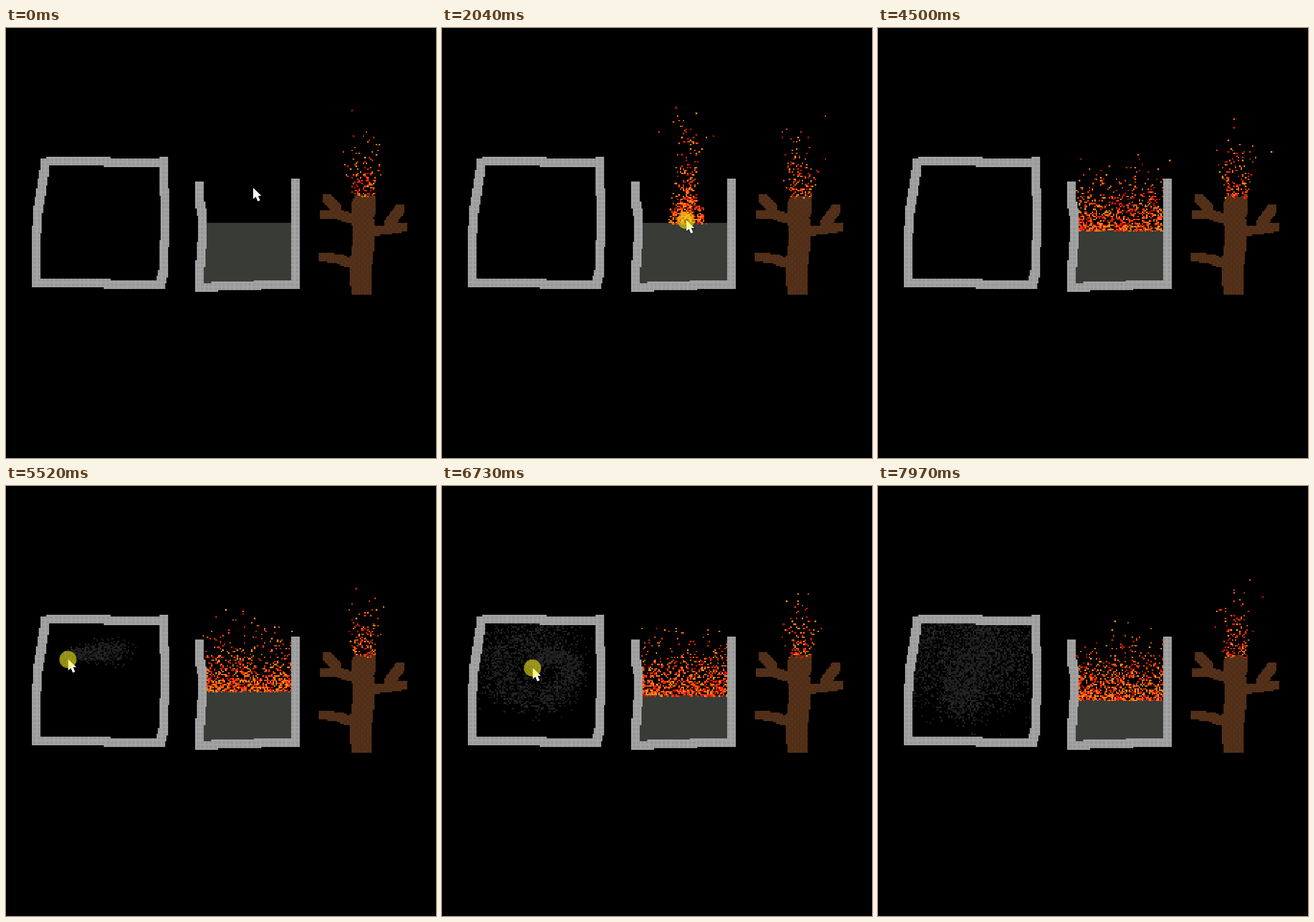
Animation, 748 px wide and 748 px high, one loop 8 s. Source, as an HTML page with a canvas:

```html
<!DOCTYPE html>
<html lang="en">
<head>
<meta charset="utf-8">
<title>Falling particles</title>
<style>
html, body { margin: 0; width: 100%; height: 100%; overflow: hidden; background: #000; }
canvas { display: block; width: 748px; height: 748px; }
</style>
</head>
<body>
<canvas id="stage" width="748" height="748"></canvas>
<script>
const SIZE = 748, CELL = SIZE / 300, LOOP = 8000, STEP = 140 / 3;
const FIRE_ON = 1000, FIRE_OFF = 2300, SMOKE_ON = 5060, SMOKE_OFF = 7250;
const FLAMES = ['#ff0d00', '#ff2a00', '#ff4a10', '#ff7a08', '#ff8c1a'];
const ctx = document.getElementById('stage').getContext('2d');

function rnd(a, b, c) {
  let h = Math.imul(a + 911, 0x9E3779B1) ^ Math.imul(b + 77, 0x85EBCA6B) ^ Math.imul(c + 13, 0xC2B2AE35);
  h = Math.imul(h ^ h >>> 15, 0x2C1B3C6D);
  h = Math.imul(h ^ h >>> 12, 0x297A2D39);
  return ((h ^ h >>> 15) >>> 0) / 4294967296;
}
const clamp = (v, lo, hi) => Math.max(lo, Math.min(hi, v));
const bell = (a, b, c) => (rnd(a, b, c) + rnd(a, b, c + 1) + rnd(a, b, c + 2) - 1.5) * 2;

// Random offset inside a disc
function inDisc(a, b, c, radius) {
  const turn = rnd(a, b, c) * Math.PI * 2, r = Math.sqrt(rnd(a, b, c + 1)) * radius;
  return { x: Math.cos(turn) * r, y: Math.sin(turn) * r };
}

function block(g, x0, y0, x1, y1, color) {
  const l = Math.round(x0 * CELL), t = Math.round(y0 * CELL);
  g.fillStyle = color;
  g.fillRect(l, t, Math.round(x1 * CELL) - l, Math.round(y1 * CELL) - t);
}
function dot(g, x, y, color) {
  x = Math.floor(x);
  y = Math.floor(y);
  block(g, x, y, x + 1, y + 1, color);
}

const stone = (x, y) => x % 3 && y % 3 ? '#999' : '#a4a4a4';
const bark = (x, y) => (x + y) % 4 && (x - y) % 4 ? '#56321a' : '#4c2b16';

// Drags a square brush along a polyline of cells
function stroke(g, brush, paint, ...points) {
  for (let i = 1; i < points.length; i++) {
    const [x0, y0] = points[i - 1], [x1, y1] = points[i];
    const n = Math.max(Math.abs(x1 - x0), Math.abs(y1 - y0));
    for (let k = 0; k <= n; k++) {
      const left = Math.round(x0 + (x1 - x0) * k / n), top = Math.round(y0 + (y1 - y0) * k / n);
      for (let y = top; y < top + brush; y++)
        for (let x = left; x < left + brush; x++) dot(g, x, y, paint(x, y));
    }
  }
}

function makeScene() {
  const layer = document.createElement('canvas');
  layer.width = layer.height = SIZE;
  const g = layer.getContext('2d');
  // closed box
  stroke(g, 6, stone, [24, 91], [24, 95], [19, 127], [18, 148], [18, 175], [30, 175], [105, 176]);
  stroke(g, 6, stone, [28, 90], [107, 91]);
  stroke(g, 6, stone, [107, 90], [107, 100], [108, 124], [108, 135], [107, 159], [107, 166], [105, 174], [105, 176]);
  // cup
  stroke(g, 6, stone, [132, 107], [132, 118], [134, 128], [134, 142], [132, 168], [132, 178], [138, 178],
    [146, 177], [199, 176], [199, 105]);
  // tree
  stroke(g, 14, bark, [241, 172], [240, 162], [242, 148], [243, 136], [241, 121], [244, 115]);
  stroke(g, 6, bark, [221, 116], [228, 123]);
  stroke(g, 6, bark, [219, 127], [229, 127], [238, 130]);
  stroke(g, 6, bark, [218, 157], [229, 158], [237, 161]);
  stroke(g, 6, bark, [252, 139], [274, 136]);
  stroke(g, 6, bark, [272, 123], [264, 134]);
  return layer;
}
const scene = makeScene();

// Smooth curve through points that are evenly spaced in time
function curve(points, start, gap, t) {
  const pos = clamp((t - start) / gap, 0, points.length - 1);
  const i = Math.min(Math.floor(pos), points.length - 2), u = pos - i;
  const at = k => points[clamp(k, 0, points.length - 1)];
  const mix = n => {
    const a = at(i - 1)[n], b = at(i)[n], c = at(i + 1)[n], d = at(i + 2)[n];
    return b + u * (c - a + u * (2 * a - 5 * b + 4 * c - d + u * (3 * (b - c) + d - a))) / 2;
  };
  return { x: mix(0), y: mix(1) };
}
const DIP = [[430, 278], [430, 306], [425, 334], [427, 332]];
const EXIT = [[427, 332], [428, 300], [442, 215], [770, 45]];
const SWIRL = [[770, 200], [268, 285], [160, 292], [107, 303], [115, 360], [190, 377],
  [228, 322], [183, 296], [147, 334], [146, 375], [148, 394]];

function pointerAt(t) {
  if (t < 2400) return curve(DIP, 0, 1000, t);
  if (t < 4000) return curve(EXIT, 2400, 530, t);
  return curve(SWIRL, 4740, 260, t);
}

const surfaceAt = t => 136 + Math.max(0, t - 2400) * 0.00234;
const spreadAt = t => Math.max(0, t - FIRE_ON) * 0.0131;

// Sparks born at each step rise, drift and die out at random
function sparks(step, seed, o) {
  for (let age = 0; age < o.life; age++) {
    const born = step - age;
    for (let j = 0; j < o.rate; j++) {
      const id = seed + j * 16;
      if (age > (1 - Math.pow(rnd(born, id, 0), 1 / o.decay)) * o.life) continue;
      const from = o.origin(born, id);
      if (!from) continue;
      const speed = o.slow + (o.fast - o.slow) * rnd(born, id, 1);
      const wobble = age ? (rnd(born, id, 40 + age) - 0.5) * 2 : 0;
      const x = from.x + bell(born, id, 2) * o.drift * age + wobble;
      const y = from.y - speed * age;
      dot(ctx, o.cup ? insideCup(x, y) : x, y, FLAMES[Math.floor(rnd(born, id, 6) * FLAMES.length)]);
    }
  }
}

function insideCup(x, y) {
  if (y < 105) return x;
  return clamp(x, y > 121 ? 140 : 138, 198);
}

function drawFire(t, step) {
  const tree = {
    rate: 14, life: 27, decay: 2, slow: 1.5, fast: 2.6, drift: 0.38,
    origin: (b, id) => ({ x: 242 + rnd(b, id, 7) * 16, y: 115 + t / 4000 + rnd(b, id, 8) * 3 })
  };
  const surface = {
    rate: 112, life: 27, decay: 2.5, slow: 1.1, fast: 2.6, drift: 0.16, cup: true,
    origin(b, id) {
      const x = 139 + rnd(b, id, 7) * 60, time = b * STEP;
      if (Math.abs(x - 171) > spreadAt(time)) return null;
      return { x, y: Math.round(surfaceAt(time)) - 1 + rnd(b, id, 8) * 1.6 };
    }
  };
  const brush = {
    rate: 26, life: 34, decay: 2.5, slow: 2, fast: 4.2, drift: 0.35, cup: true,
    origin(b, id) {
      const time = b * STEP;
      if (time < FIRE_ON || time > FIRE_OFF) return null;
      const p = pointerAt(time), d = inDisc(b, id, 7, 6);
      return { x: p.x / CELL + d.x, y: Math.min(p.y / CELL + d.y, surfaceAt(time) - 1) };
    }
  };
  sparks(step, 5000, tree);
  sparks(step, 9000, surface);
  sparks(step, 20000, brush);
}

function bounce(v, lo, hi) {
  if (v < lo) v = 2 * lo - v;
  if (v > hi) v = 2 * hi - v;
  return clamp(v, lo, hi);
}

function drawSmoke(t, step) {
  const last = Math.min(t, SMOKE_OFF) / STEP;
  for (let b = Math.ceil(SMOKE_ON / STEP); b <= last; b++) {
    const p = pointerAt(b * STEP), age = (step - b) * STEP / 1000;
    const reach = 7.5 * Math.pow(age, 0.85);
    for (let j = 0; j < 70; j++) {
      const id = 40000 + j * 16, d = inDisc(b, id, 0, 5);
      const jitter = rnd(step, b * 64 + j, 3) - 0.5;
      const y = bounce(p.y / CELL + d.y + bell(b, id, 2) * reach - age * 5 + jitter, 96, 174);
      const left = Math.max(24, 30 - (y - 96) * 0.14);
      const x = bounce(p.x / CELL + d.x + bell(b, id, 6) * reach + jitter, left, 106);
      const tone = 22 + Math.floor(rnd(b, id, 10) * 20);
      dot(ctx, x, y, `rgb(${tone},${tone},${tone})`);
    }
  }
}

// Flames slowly eat the top of the trunk
function drawBurntTop(t, step) {
  for (let x = 241; x < 258; x++)
    block(ctx, x, 113, x + 1, Math.round(115 + t / 4000 + rnd(x, Math.floor(step / 12), 4) * 2), '#000');
}

function drawPointer(t) {
  if (t > SMOKE_OFF + 150) return;
  const { x, y } = pointerAt(t);
  ctx.save();
  ctx.translate(x, y);
  const arrow = new Path2D('M0 0V19.5L4.5 15.5L8 23.5L12 21.7L8.5 14H14.2Z');
  ctx.strokeStyle = '#000';
  ctx.lineWidth = 1.5;
  ctx.stroke(arrow);
  ctx.fillStyle = '#fff';
  ctx.fill(arrow);
  if ((t > FIRE_ON && t < FIRE_OFF) || (t > SMOKE_ON && t < SMOKE_OFF)) {
    ctx.fillStyle = 'rgba(255,245,25,.55)';
    ctx.beginPath();
    ctx.arc(-0.5, 0.5, 15, 0, Math.PI * 2);
    ctx.fill();
  }
  ctx.restore();
}

function draw() {
  const step = Math.floor(performance.now() % LOOP / STEP), t = step * STEP;
  ctx.fillStyle = '#000';
  ctx.fillRect(0, 0, SIZE, SIZE);
  drawSmoke(t, step);
  block(ctx, 138, Math.round(surfaceAt(t)), 199, 179, '#383b36');
  ctx.drawImage(scene, 0, 0);
  drawBurntTop(t, step);
  drawFire(t, step);
  drawPointer(t);
  requestAnimationFrame(draw);
}
draw();
</script>
</body>
</html>
```
